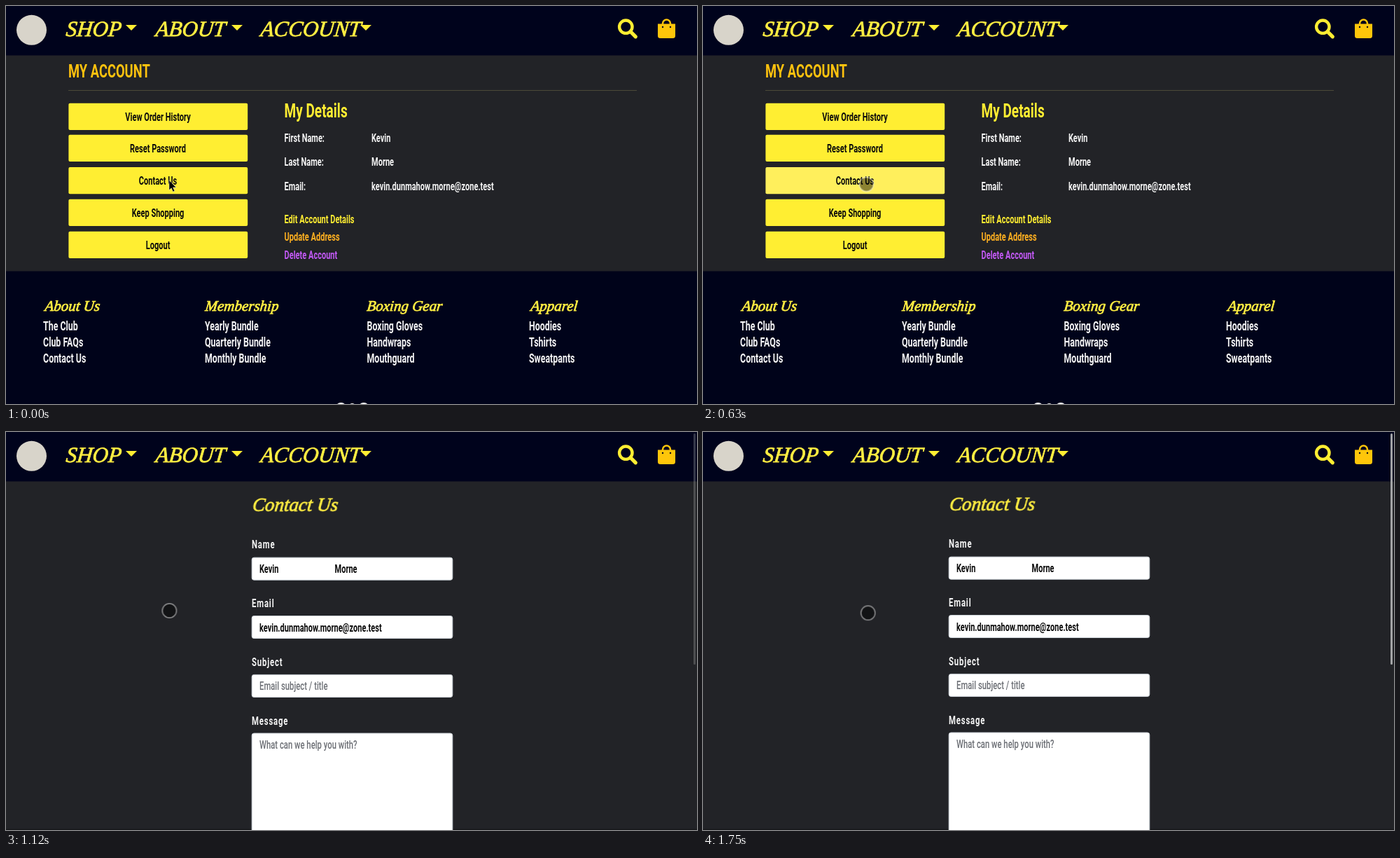
Write an HTML page that moves like this. It is 987 px wide and 568 px high and loops after 1.82 s.

```html
<!DOCTYPE html>
<html lang="en">
<head>
<meta charset="utf-8">
<title>Account</title>
<style>
html, body { margin: 0; height: 100%; overflow: hidden; background: #222327; }
svg { display: block; width: 987px; height: 568px; }

/* condensed sans face */
.c text {
  font: 600 16px Roboto, "Liberation Sans", sans-serif;
  transform-box: fill-box; transform: scaleX(.69);
}
.c .mid { text-anchor: middle; transform-origin: 50% 0; }
.c .h1 { font-size: 26.6px; }
.c .h2 { font-size: 27.6px; }
.c .label { font-size: 16.5px; letter-spacing: 1.2px; }
.c .hint { font-size: 16.4px; font-weight: 500; fill: #6c6f75; }
.list text { font-size: 18px; }

/* display italic */
.s text {
  font: italic 27px "Liberation Serif", "Noto Serif", serif;
  fill: #ffee42; stroke: #ffee42; stroke-width: .8px;
  transform-box: fill-box; transform-origin: 0 78%; transform: skewX(-6deg);
}
.s.nav text { font-size: 31px; }
.s.foot text { font-size: 21px; }

.y { fill: #ffee32; }
.w { fill: #f4f4f4; }
.field { fill: #fff; stroke: #ced4da; }

.account, .contact, .arrow, .dot, .press, .bar, .page {
  animation: 1820ms step-end infinite;
}
.account { animation-name: account; }
.contact { animation-name: contact; }
.arrow { animation-name: arrow; }
.dot { animation-name: dot, drift; }
.press { animation-name: press; animation-timing-function: linear; }
.bar { animation-name: bar; }
.page { animation-name: scroll; }

@keyframes account { 0% { opacity: 1 } 38.4%, 100% { opacity: 0 } }
@keyframes contact { 0% { opacity: 0 } 38.4%, 100% { opacity: 1 } }
@keyframes arrow { 0% { opacity: 1 } 11.5%, 100% { opacity: 0 } }
@keyframes dot { 0% { opacity: 0 } 11.5%, 100% { opacity: 1 } }
@keyframes press { 0%, 29% { fill: #ffee32 } 34.5%, 100% { fill: #ffef5c } }
@keyframes bar {
  0% { opacity: 1 }
  49.95% { opacity: 1; animation-timing-function: steps(6, start) }
  73% { opacity: 0 }
  96.1%, 100% { opacity: 1 }
}
@keyframes drift {
  0% { transform: translate(233.4px, 254.5px) }
  49.95% { transform: translate(233.4px, 255px) }
  80.7% { transform: translate(233.4px, 255.5px); animation-timing-function: steps(4) }
  96.1%, 100% { transform: translate(235.7px, 258.2px) }
}
@keyframes scroll { 0% { transform: none } 96.1%, 100% { transform: translateY(-1px) } }
</style>
</head>
<body>
<svg viewBox="0 0 987 568">
  <rect width="987" height="568" fill="#222327"/>

  <g class="account">
    <path d="M89 120.5H901" stroke="#4b4938"/>
    <g class="y">
      <rect x="89.4" y="138.7" width="255.8" height="38.2" rx="2"/>
      <rect x="89.4" y="183.8" width="255.8" height="38.2" rx="2"/>
      <rect class="press" x="89.4" y="230" width="255.8" height="38.2" rx="2"/>
      <rect x="89.4" y="275.8" width="255.8" height="38.2" rx="2"/>
      <rect x="89.4" y="321.7" width="255.8" height="38.2" rx="2"/>
    </g>
    <g class="c" fill="#0b0b0b">
      <text class="mid" x="217" y="164">View Order History</text>
      <text class="mid" x="217" y="209">Reset Password</text>
      <text class="mid" x="217" y="255.3">Contact Us</text>
      <text class="mid" x="217" y="301">Keep Shopping</text>
      <text class="mid" x="217" y="347">Logout</text>
    </g>
    <g class="c w">
      <text class="h1" x="89" y="102.5" fill="#ffc20e">MY ACCOUNT</text>
      <text class="h2 y" x="397.5" y="159.5">My Details</text>
      <text x="397.5" y="194">First Name:</text>
      <text x="397.5" y="228.3">Last Name:</text>
      <text x="397.5" y="263">Email:</text>
      <text x="522" y="194">Kevin</text>
      <text x="522" y="228.3">Morne</text>
      <text x="522" y="263">kevin.dunmahow.morne@zone.test</text>
      <text class="y" x="397.5" y="310">Edit Account Details</text>
      <text x="397.5" y="335" fill="#ffb020">Update Address</text>
      <text x="397.5" y="361" fill="#c259f5">Delete Account</text>
    </g>

    <rect y="378.5" width="987" height="190" fill="#00031a"/>
    <g class="s foot">
      <text x="55" y="435">About Us</text>
      <text x="284" y="435">Membership</text>
      <text x="515" y="435">Boxing Gear</text>
      <text x="749" y="435">Apparel</text>
    </g>
    <g class="c w list">
      <text x="53" y="463">The Club</text>
      <text x="53" y="486">Club FAQs</text>
      <text x="53" y="509">Contact Us</text>
      <text x="284" y="463">Yearly Bundle</text>
      <text x="284" y="486">Quarterly Bundle</text>
      <text x="284" y="509">Monthly Bundle</text>
      <text x="515.5" y="463">Boxing Gloves</text>
      <text x="515.5" y="486">Handwraps</text>
      <text x="515.5" y="509">Mouthguard</text>
      <text x="747" y="463">Hoodies</text>
      <text x="747" y="486">Tshirts</text>
      <text x="747" y="509">Sweatpants</text>
    </g>
    <g class="w">
      <circle cx="478.5" cy="574" r="8"/>
      <circle cx="494.5" cy="571" r="4"/>
      <circle cx="511" cy="574" r="8"/>
    </g>
  </g>

  <g class="contact">
    <rect y="566.5" width="987" height="2" fill="#17181b"/>
    <g class="page">
      <g class="s"><text x="351.5" y="112.5">Contact Us</text></g>
      <g class="field">
        <rect x="351.2" y="179.2" width="286.6" height="32" rx="3"/>
        <rect x="351.2" y="262.5" width="286.6" height="32" rx="3"/>
        <rect x="351.2" y="346.4" width="286.6" height="32" rx="3"/>
        <rect x="351.2" y="430" width="286.6" height="160" rx="3"/>
      </g>
      <g class="c w">
        <text class="label" x="351" y="166">Name</text>
        <text class="label" x="351" y="250">Email</text>
        <text class="label" x="351" y="334">Subject</text>
        <text class="label" x="351" y="417.7">Message</text>
      </g>
      <g class="c" fill="#0b0b0b">
        <text x="362" y="201">Kevin</text>
        <text x="469.5" y="201">Morne</text>
        <text x="362" y="285">kevin.dunmahow.morne@zone.test</text>
        <text class="hint" x="362" y="368.5">Email subject / title</text>
        <text class="hint" x="362" y="452">What can we help you with?</text>
      </g>
    </g>
  </g>

  <rect width="987" height="70.5" fill="#00031c"/>
  <circle cx="36.5" cy="34.3" r="21.5" fill="#d8d4ca"/>
  <g class="s nav">
    <text x="85" y="43">SHOP</text>
    <text x="213" y="43">ABOUT</text>
    <text x="363" y="43">ACCOUNT</text>
  </g>
  <path class="y" d="M171 27h16l-8 8zM322 27h16l-8 8zM506 27h16l-8 8z"/>
  <g fill="none" stroke="#ffee32" stroke-width="4.4">
    <circle cx="885.3" cy="29.7" r="9.2"/>
    <path d="M892 36.5l7.3 7.3" stroke-width="5.2" stroke-linecap="round"/>
  </g>
  <g fill="#ffc60a">
    <path d="M931 25.5h25v17a3.6 3.6 0 0 1-3.6 3.6h-17.8a3.6 3.6 0 0 1-3.6-3.6z"/>
    <path d="M938 30v-5a5.5 5.5 0 0 1 11 0v5" fill="none" stroke="#ffc60a" stroke-width="2.6"/>
    <g fill="#00031c"><circle cx="938" cy="30" r="1.2"/><circle cx="949" cy="30" r="1.2"/></g>
  </g>

  <g class="contact">
    <rect class="bar" x="982" y="2" width="3" height="330" rx="1.5" fill="#a3a4a6"/>
  </g>
  <path class="arrow" d="M233 248.6v14.2l3.2-3 2.3 5.3 2.4-1-2.3-5.2h4.4z" fill="#000" stroke="#fff" stroke-opacity=".6" stroke-width=".8"/>
  <circle class="dot" r="10.1" fill="#000" fill-opacity=".45" stroke="#fff" stroke-opacity=".45" stroke-width="1.7"/>
</svg>
</body>
</html>
```
